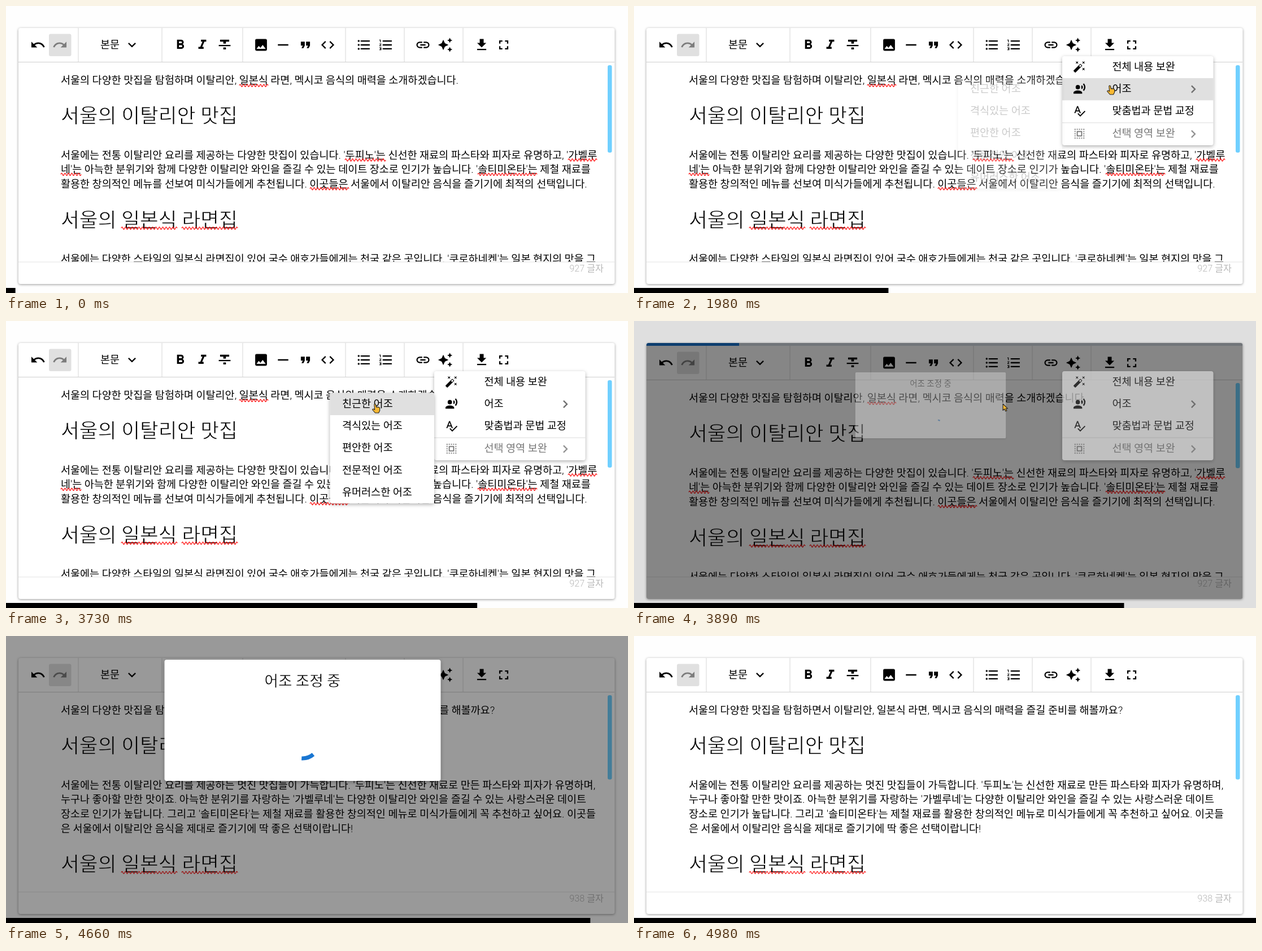
Animation, 1101 px wide and 509 px high, one loop 6.98 s. Source, as an HTML page:

```html
<!DOCTYPE html>
<html lang="ko">
<head>
<meta charset="utf-8">
<title>Editor tone demo</title>
<style>
html, body { margin: 0; width: 100%; height: 100%; overflow: hidden; background: #fefefe; }
svg { display: block; font-family: Roboto, "Noto Sans CJK KR", "Noto Sans CJK", sans-serif; }
.card { filter: drop-shadow(0 1px 2px rgba(0,0,0,.4)); }
.pop { filter: drop-shadow(0 2px 3px rgba(0,0,0,.32)); }
/* A white outline trims the strokes to a light weight. */
.light { stroke: #fff; stroke-width: .8px; }
</style>
</head>
<body>
<svg id="stage" width="1101" height="509" viewBox="0 0 1101 509" xmlns="http://www.w3.org/2000/svg"></svg>
<script>
const LOOP = 6980;
const BODY = 18.52, HEAD = 35.7;

const dot = y => `M2.5,${y}a1.5,1.5 0 1,0 3,0a1.5,1.5 0 1,0 -3,0`;
const icons = {
  undo: 'M12.5,8C9.85,8 7.45,9 5.6,10.6L2,7V16H11L7.38,12.38C8.77,11.22 10.54,10.5 12.5,10.5C16.04,10.5 19.09,12.81 20.15,16L22.52,15.22C21.13,11.03 17.15,8 12.5,8Z',
  down: 'M7.41,8.58L12,13.17L16.59,8.58L18,10L12,16L6,10Z',
  right: 'M8.59,16.58L13.17,12L8.59,7.41L10,6L16,12L10,18Z',
  bold: 'M13.5,15.5H10V12.5H13.5A1.5,1.5 0 0,1 13.5,15.5M10,6.5H13A1.5,1.5 0 0,1 13,9.5H10M15.6,10.79C16.57,10.11 17.25,9 17.25,8C17.25,5.74 15.5,4 13.25,4H7V18H14.04C16.14,18 17.75,16.3 17.75,14.21C17.75,12.69 16.89,11.39 15.6,10.79Z',
  italic: 'M10,4V7H12.21L8.79,15H6V18H14V15H11.79L15.21,7H18V4Z',
  strike: 'M3,14H21V12H3M5,4V7H10V10H14V7H19V4M10,19H14V16H10Z',
  image: 'M8.5,13.5L11,16.5L14.5,12L19,18H5M21,19V5C21,3.89 20.1,3 19,3H5A2,2 0 0,0 3,5V19A2,2 0 0,0 5,21H19A2,2 0 0,0 21,19Z',
  rule: 'M20,13H4V11H20Z',
  quote: 'M14,17H17L19,13V7H13V13H16M6,17H9L11,13V7H5V13H8Z',
  code: 'M14.6,16.6L19.2,12L14.6,7.4L16,6L22,12L16,18M9.4,16.6L4.8,12L9.4,7.4L8,6L2,12L8,18Z',
  bullets: 'M7,5H21V7H7M7,11H21V13H7M7,17H21V19H7' + dot(6) + dot(12) + dot(18),
  numbers: 'M7,5H21V7H7M7,11H21V13H7M7,17H21V19H7M3,8V5H2V4H4V8M2,17V16H5V20H2V19H4V18.5H3V17.5H4V17M2,10H5V11L3.12,13H5V14H2V13.08L4,11H2Z',
  link: 'M3.9,12C3.9,10.29 5.29,8.9 7,8.9H11V7H7A5,5 0 0,0 7,17H11V15.1H7C5.29,15.1 3.9,13.71 3.9,12M8,13H16V11H8M17,7H13V8.9H17C18.71,8.9 20.1,10.29 20.1,12C20.1,13.71 18.71,15.1 17,15.1H13V17H17A5,5 0 0,0 17,7Z',
  stars: 'M19,1L17.74,3.75L15,5L17.74,6.26L19,9L20.25,6.26L23,5L20.25,3.75M9,4L6.5,9.5L1,12L6.5,14.5L9,20L11.5,14.5L17,12L11.5,9.5M19,15L17.74,17.74L15,19L17.74,20.25L19,23L20.25,20.25L23,19L20.25,17.74Z',
  save: 'M5,20H19V18H5M19,9H15V3H9V9H5L12,16Z',
  full: 'M5,5H10V7H7V10H5M14,5H19V10H17V7H14M17,14H19V19H14V17H17M10,17V19H5V14H7V17Z',
  wand: 'M7.5,5.6L5,7L6.4,4.5L5,2L7.5,3.4L10,2L8.6,4.5L10,7M19.5,15.4L22,14L20.6,16.5L22,19L19.5,17.6L17,19L18.4,16.5L17,14M22,2L20.6,4.5L22,7L19.5,5.6L17,7L18.4,4.5L17,2L19.5,3.4M13.34,12.78L15.78,10.34L13.66,8.22L11.22,10.66M14.37,7.29L16.71,9.63Q17.3,10.3 16.71,11.04L5.04,22.71Q4.3,23.3 3.63,22.71L1.29,20.37Q.7,19.6 1.29,18.96L12.96,7.29Q13.7,6.7 14.37,7.29Z',
  voice: 'M9,5A4,4 0 0,1 9,13A4,4 0 0,1 9,5M9,15C11.67,15 17,16.34 17,19V21H1V19C1,16.34 6.33,15 9,15M16.76,5.36C18.78,7.56 18.78,10.61 16.76,12.63L15.08,10.94C15.92,9.76 15.92,8.23 15.08,7.05M20.07,2C24,6.05 23.97,12.11 20.07,16L18.44,14.37C21.21,11.19 21.21,6.65 18.44,3.63Z',
  spell: 'M21.59,11.59L13.5,19.68L9.83,16L8.42,17.41L13.5,22.5L23,13M6.43,11L8.5,5.5L10.57,11M12.45,16H14.54L9.43,3H7.57L2.46,16H4.55L5.67,13H11.31Z'
};

const text = (x, y, s, size = BODY, more = '') =>
  `<text x="${x}" y="${y}" font-size="${size}" font-weight="350" ${more}>${s}</text>`;
const heading = (y, s) => text(97, y, s, HEAD, 'class="light"');
const rect = (x, y, w, h, fill, more = '') =>
  `<rect x="${x}" y="${y}" width="${w}" height="${h}" fill="${fill}" ${more}/>`;
const icon = (name, x, y = 69, scale = 1.155, flip = 1, fill = '#000') =>
  `<path d="${icons[name]}" fill="${fill}" fill-rule="evenodd" transform="translate(${x} ${y}) scale(${scale * flip} ${scale}) translate(-12 -12)"/>`;
const wave = (x1, x2, y) =>
  `<path d="M${x1},${y}q1.5,-4.2 3,0${'t3,0'.repeat(Math.round((x2 - x1) / 3) - 1)}" fill="none" stroke="#f00" stroke-width="1.2"/>`;
const lines = (first, list) => list.map((s, i) => text(97, first + i * 25.6, s)).join('');

function toolbar() {
  const row = { bold: 308.5, italic: 347.5, strike: 387, image: 451.5, rule: 490.5, quote: 530, code: 569.5,
    bullets: 633.5, numbers: 672.5, link: 738, stars: 777.5, save: 842, full: 881 };
  return rect(22, 99, 1055, 1, '#cfcfcf') +
    [128, 276, 419, 601, 705, 809].map(x => rect(x - .5, 39, 1, 60, '#d6d6d6')).join('') +
    rect(76, 49.5, 39.5, 39.5, '#e0e0e0', 'rx="3"') +
    rect(758, 49.5, 39.5, 39.5, '#e0e0e0', 'rx="3" id="hover"') +
    icon('undo', 56.5) + icon('undo', 95.5, 69, 1.155, -1, '#7c7c7c') +
    text(167, 75, '본문') + icon('down', 223) +
    Object.entries(row).map(([n, x]) => icon(n, x)).join('');
}

const before = text(97, 137.6, '서울의 다양한 맛집을 탐험하며 이탈리안, 일본식 라면, 멕시코 음식의 매력을 소개하겠습니다.') +
  lines(270.8, [
    "서울에는 전통 이탈리안 요리를 제공하는 다양한 맛집이 있습니다. '두피노'는 신선한 재료의 파스타와 피자로 유명하고, '가벨루",
    "네'는 아늑한 분위기와 함께 다양한 이탈리안 와인을 즐길 수 있는 데이트 장소로 인기가 높습니다. '솔티미온타'는 제철 재료를",
    '활용한 창의적인 메뉴를 선보여 미식가들에게 추천됩니다. 이곳들은 서울에서 이탈리안 음식을 즐기기에 최적의 선택입니다.']) +
  text(97, 455.4, "서울에는 다양한 스타일의 일본식 라면집이 있어 국수 애호가들에게는 천국 같은 곳입니다. '쿠로하네켄'는 일본 현지의 맛을 그") +
  wave(413, 464, 141) + wave(600, 672, 273) + wave(995, 1046, 273) + wave(97, 133, 298.5) +
  wave(835, 940, 298.5) + wave(538, 607, 324);

const after = text(97, 137.6, '서울의 다양한 맛집을 탐험하면서 이탈리안, 일본식 라면, 멕시코 음식의 매력을 즐길 준비를 해볼까요?') +
  lines(270.8, [
    "서울에는 전통 이탈리안 요리를 제공하는 멋진 맛집들이 가득합니다. '두피노'는 신선한 재료로 만든 파스타와 피자가 유명하며,",
    "누구나 좋아할 만한 맛이죠. 아늑한 분위기를 자랑하는 '가벨루네'는 다양한 이탈리안 와인을 즐길 수 있는 사랑스러운 데이트",
    "장소로 인기가 높답니다. 그리고 '솔티미온타'는 제철 재료를 활용한 창의적인 메뉴로 미식가들에게 꼭 추천하고 싶어요. 이곳들",
    '은 서울에서 이탈리안 음식을 제대로 즐기기에 딱 좋은 선택이랍니다!']);

function selectIcon(x, y) {
  return `<g fill="none" stroke="#777" stroke-width="1.8"><rect x="${x - 3.9}" y="${y - 3.9}" width="7.8" height="7.8"/>` +
    `<rect x="${x - 7.8}" y="${y - 7.8}" width="15.6" height="15.6" stroke-dasharray="1.95 1.95" stroke-dashoffset=".97"/></g>`;
}

function menu() {
  const labels = ['전체 내용 보완', '어조', '맞춤법과 문법 교정', '선택 영역 보완'];
  const marks = ['wand', 'voice', 'spell'];
  return rect(758, 89, 267.5, 158, '#fff', 'rx="4" class="pop"') +
    rect(758, 128, 267.5, 39.3, '#e0e0e0', 'id="toneRow"') + rect(758, 206.5, 267.5, 1, '#dcdcdc') +
    labels.map((s, i) => text(846.5, 113.6 + i * 39.4, s, BODY, i === 3 ? 'fill="#777"' : '')).join('') +
    marks.map((n, i) => icon(n, 788.5, 107.5 + i * 39.3, .96)).join('') + selectIcon(788.5, 226.5) +
    icon('right', 990, 147.5, 1.155, 1, '#6f6f6f') + icon('right', 990, 227, 1.155, 1, '#929292');
}

function submenu() {
  const tones = ['친근한', '격식있는', '편안한', '전문적인', '유머러스한'];
  return rect(573.5, 127.5, 184.5, 196, '#fff', 'rx="4" class="pop"') +
    rect(573.5, 127.5, 184.5, 39.5, '#e0e0e0', 'id="pickRow"') +
    tones.map((s, i) => text(595, 153 + i * 39.2, s + ' 어조')).join('');
}

document.getElementById('stage').innerHTML = `
<defs>
  <clipPath id="cardClip"><rect x="22" y="39" width="1055.5" height="454" rx="4"/></clipPath>
  <clipPath id="pageClip"><rect x="22" y="39" width="1055.5" height="415"/></clipPath>
</defs>
${rect(0, 0, 1101, 509, '#fefefe')}
${rect(22, 39, 1055.5, 454, '#fff', 'rx="4" class="card"')}
<g clip-path="url(#pageClip)"><g id="content">
  ${toolbar()}
  ${heading(206.6, '서울의 이탈리안 맛집')}
  <g id="before">${before}</g><g id="after">${after}</g>
  <g id="ramen">${heading(391.6, '서울의 일본식 라면집')}${wave(204, 302, 394)}${wave(311, 410, 394)}</g>
  ${rect(586.5, 282, 1.5, 18, '#000', 'id="caret"')}
  ${rect(1065, 105, 7.5, 155, '#70d0ff', 'rx="3" id="thumb"')}
</g></g>
${rect(22, 453.5, 1055.5, 1, '#e4e4e4')}
${text(1058, 471.4, '', 16.2, 'id="count" fill="#b8b8b8" text-anchor="end"')}
<g id="loader" clip-path="url(#cardClip)">
  ${rect(22, 39, 1055.5, 5, '#d4dde6')}${rect(22, 39, 0, 5, '#1976d2', 'id="strip"')}
  ${rect(22, 39, 1055.5, 454, '#000', 'opacity=".4"')}
</g>
<g id="menu">${menu()}</g>
<g id="submenu">${submenu()}</g>
${rect(0, 0, 1101, 509, '#000', 'id="shade"')}
<g id="dialog">
  ${rect(280.5, 42, 489, 215, '#fff', 'rx="4" class="pop"')}
  ${text(525, 88.6, '어조 조정 중', 26.5, 'text-anchor="middle" class="light" style="stroke-width:.4px"')}
  <circle id="spinner" cx="525" cy="188" r="29" fill="none" stroke="#1976d2" stroke-width="7" pathLength="125.66"/>
</g>
<g id="pointer" stroke="#222" stroke-width="1.1" stroke-linejoin="round" fill="#f8b832">
  <path id="arrow" d="M0,0V11.5L2.8,9L4.8,13L6.8,12L5,8.3H8.6Z"/>
  <path id="hand" d="M-1.2,1Q0,-1 1.4,1L2.6,6L4,5.2L5.2,6L6.6,5.6L8.6,7V12L6.6,16H.5L-4.3,10.5Q-4.3,8.6 -2.4,9L-.4,10.4Z"/>
</g>
${rect(0, 500, 0, 9, '#000', 'id="bar"')}`;

const el = {};
document.querySelectorAll('svg [id]').forEach(e => el[e.id] = e);
const set = (id, attrs) => { for (const k in attrs) el[id].setAttribute(k, attrs[k]); };
const alpha = (id, v) => { el[id].style.display = v > 0 ? '' : 'none'; set(id, { opacity: v }); };
const ramp = (t, a, b) => Math.max(0, Math.min(1, (t - a) / (b - a)));
const smooth = p => p * p * (3 - 2 * p);

// Linear interpolation over rows of [key, ...values].
function track(rows, key) {
  let i = 0;
  while (i < rows.length - 2 && key >= rows[i + 1][0]) i++;
  const [a, b] = [rows[i], rows[i + 1]], p = ramp(key, a[0], b[0]);
  return a.slice(1).map((v, k) => v + (b[k + 1] - v) * p);
}

const STEPS = 66;
const pace = [[0, 0], [1, 70], [10, 720], [11, 820], [15, 1120], [16, 1190], [20, 1510], [21, 1590], [26, 1980],
  [27, 2040], [30, 2270], [31, 2350], [39, 2960], [40, 3050], [49, 3730], [50, 3830], [51, 3890], [52, 3980],
  [59, 4510], [60, 4590], [61, 4660], [62, 4750], [65, 4980]];
const ticks = Array.from({ length: STEPS }, (_, i) => Math.round(track(pace, i)[0] / 10) * 10);
const path = [[70, 1056, 190], [400, 930, 110], [650, 800, 62], [720, 783, 73], [1560, 783, 73], [1780, 842, 141],
  [2350, 842, 141], [2700, 662, 146], [2900, 653, 147], [3800, 653, 147]];

function spin(ms) {
  const p = (ms / 1400) % 1, e = smooth(p * 2 % 1);
  const [len, off] = p < .5 ? [1 + 99 * e, -15 * e] : [100, -15 - 109 * e];
  set('spinner', { 'stroke-dasharray': `${len} 200`, 'stroke-dashoffset': off, transform: `rotate(${p * 360} 525 188)` });
}

function draw(now) {
  let step = STEPS - 1;
  while (ticks[step] > now) step--;
  const t = ticks[step];
  const done = t >= 4590, loading = t >= 3830 && !done;

  set('bar', { width: (step + 1) * 1101 / STEPS });
  set('content', { transform: `translate(0 ${loading ? 5 : 0})` });
  set('ramen', { transform: `translate(0 ${done ? 25.6 : 0})` });
  set('thumb', { height: done ? 149.5 : loading ? 151 : 155 });
  alpha('before', done ? 0 : 1);
  alpha('after', done ? 1 : 0);
  el.count.textContent = (done ? 938 : 927) + ' 글자';
  alpha('caret', t >= 720 && t < 1270 ? 1 : 0);

  alpha('loader', loading ? 1 : 0);
  const run = (t - 3700) / 1320, left = Math.max(0, -2 + 3.07 * run), right = 1.08 * run;
  set('strip', { x: 22 + 1055 * left, width: Math.max(0, 1055 * (right - left)) });

  alpha('hover', ramp(t, 750, 820) - ramp(t, 1560, 1700));
  alpha('menu', ramp(t, 990, 1300) - ramp(t, 3850, 3964));
  alpha('toneRow', ramp(t, 1600, 1850) - ramp(t, 2400, 2650));
  alpha('submenu', ramp(t, 1920, 2220) - ramp(t, 3790, 3880));
  alpha('pickRow', .64 * ramp(t, 2500, 2750) + .36 * ramp(t, 3050, 3300));

  const enter = ramp(t, 3830, 4030), shown = enter - ramp(t, 4690, 4880);
  const scale = .5 + .5 * enter ** 2;
  alpha('shade', shown * .4);
  alpha('dialog', shown);
  set('dialog', { transform: `translate(525 149.5) scale(${scale}) translate(-525 -149.5)` });
  spin(done ? t - 4492 : Math.max(0, t - 3830));

  const [x, y] = track(path, t), hand = t >= 720 && t < 3830;
  alpha('pointer', t >= 70 && !done ? 1 : 0);
  set('pointer', { transform: `translate(${x} ${y})` });
  alpha('hand', hand ? 1 : 0);
  alpha('arrow', hand ? 0 : 1);
}

const start = performance.now();
function loop() {
  draw((performance.now() - start) % LOOP);
  requestAnimationFrame(loop);
}
loop();
</script>
</body>
</html>
```
